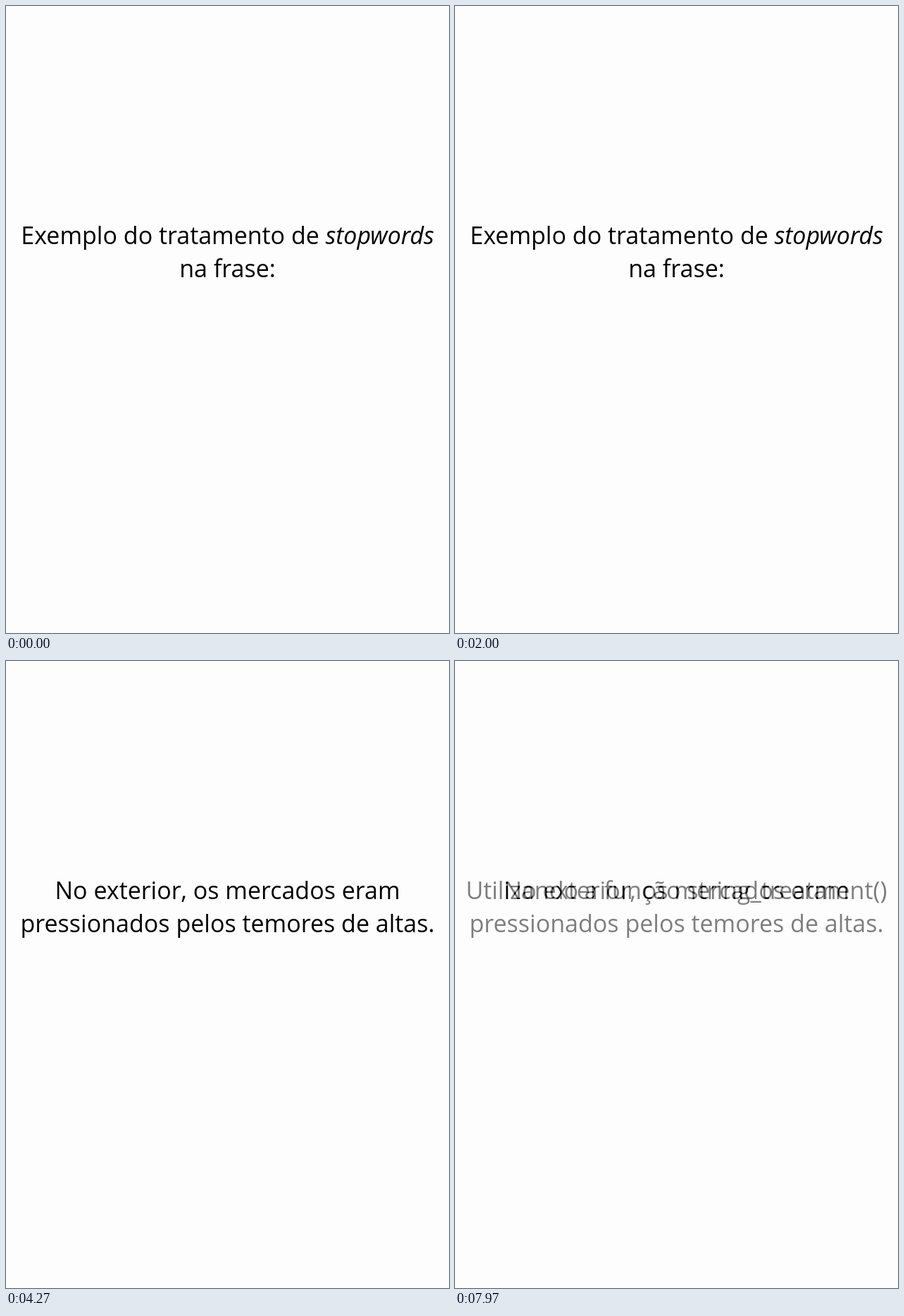
These frames come from a looping animation (629 by 890 pixels, 8000 ms). An HTML page with a canvas:

```html
<!DOCTYPE html>
<html lang="pt-BR">
<head>
<meta charset="utf-8">
<title>Stopwords</title>
<style>
  html, body { margin: 0; width: 100%; height: 100%; overflow: hidden; background: #fdfdfd; }
  canvas { display: block; }
</style>
</head>
<body>
<canvas id="stage" width="629" height="890"></canvas>
<script>
const ctx = document.getElementById('stage').getContext('2d');
const W = 629, H = 890, LOOP = 8000;
const FIRST_LINE = 338, LINE_STEP = 47;
const FACE = '34px "Open Sans", "Noto Sans", sans-serif';

// Each slide is a list of lines; *asterisks* mark italics.
const SLIDES = [
  ['Exemplo do tratamento de *stopwords*', 'na frase:'],
  ['No exterior, os mercados eram', 'pressionados pelos temores de altas.'],
  ['Utilizando a função string_treatment()']
];

// Start of each short half-and-half blend into the next slide.
const BLENDS = [3970, 7970], BLEND_TIME = 30;

function drawLine(line, y) {
  const runs = line.split('*').map((text, i) => {
    const font = (i % 2 ? 'italic ' : '') + FACE;
    ctx.font = font;
    return { text, font, width: ctx.measureText(text).width };
  });
  let x = (W - runs.reduce((sum, run) => sum + run.width, 0)) / 2;
  for (const run of runs) {
    ctx.font = run.font;
    ctx.fillText(run.text, x, y);
    x += run.width;
  }
}

function drawSlide(index, alpha) {
  ctx.globalAlpha = alpha;
  SLIDES[index].forEach((line, i) => drawLine(line, FIRST_LINE + i * LINE_STEP));
}

function render(t) {
  ctx.clearRect(0, 0, W, H);
  ctx.fillStyle = '#000';
  // Summed coverage keeps overlapping strokes fully black during a blend.
  ctx.globalCompositeOperation = 'lighter';
  const blend = BLENDS.findIndex(start => t >= start && t < start + BLEND_TIME);
  if (blend >= 0) {
    drawSlide(blend, 0.5);
    drawSlide(blend + 1, 0.5);
  } else {
    drawSlide(t < BLENDS[0] ? 0 : 1, 1);
  }
}

const begin = performance.now();
function tick() {
  render((performance.now() - begin) % LOOP);
  requestAnimationFrame(tick);
}
tick();
</script>
</body>
</html>
```
